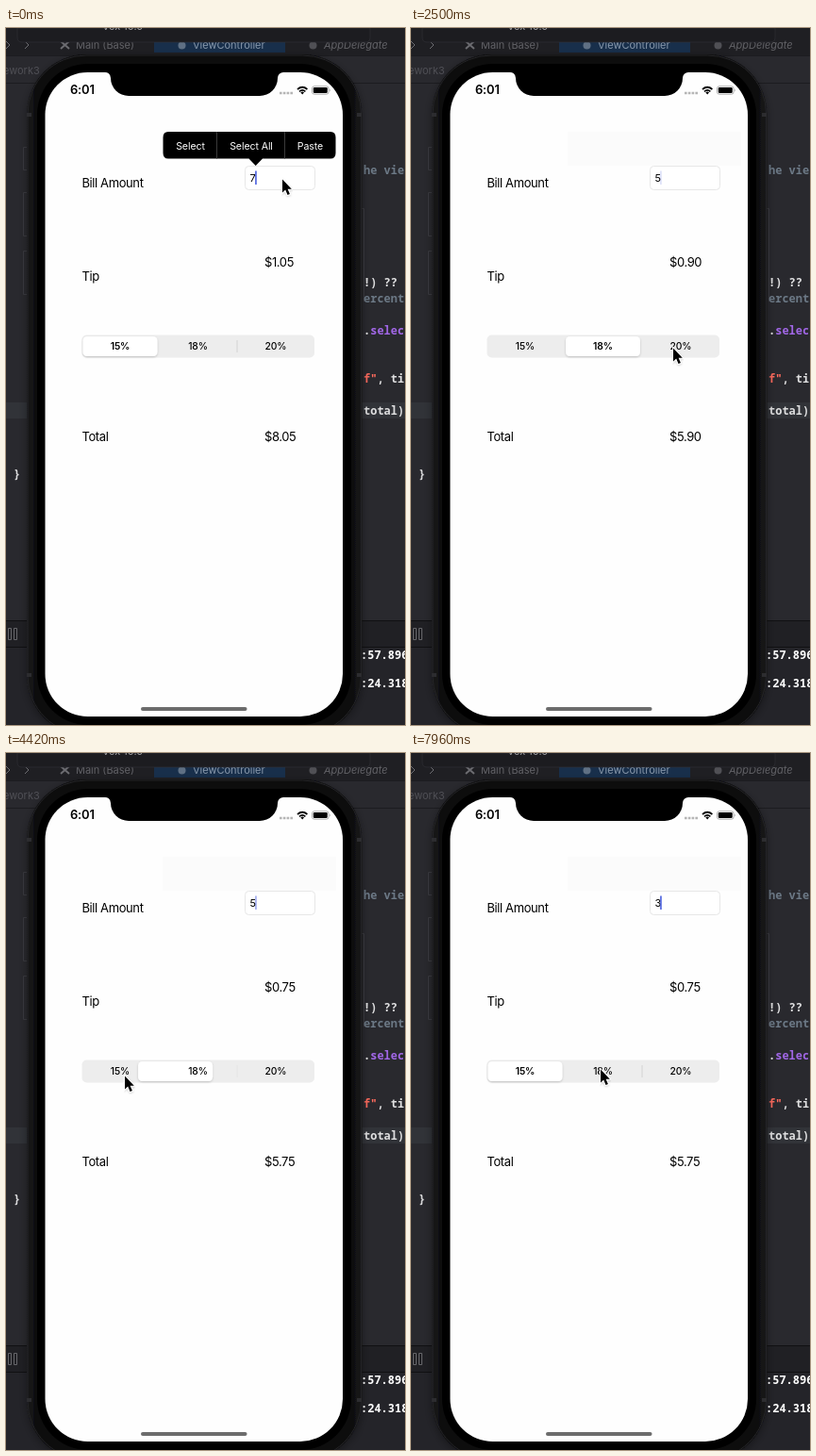
An HTML page for the animation above (8000 ms loop, 423 by 739 pixels).

```html
<!DOCTYPE html>
<html lang="en">
<head>
<meta charset="utf-8">
<title>Tip calculator</title>
<style>
  html, body { margin: 0; width: 100%; height: 100%; overflow: hidden; background: #29292e; }
  svg { display: block; width: 423px; height: 739px; font-family: Inter, "Noto Sans", sans-serif; }
  .code { font: 600 12px "Noto Sans Mono", "DejaVu Sans Mono", monospace; fill: #dfdfe0; white-space: pre; }
  .tab { font-size: 11px; fill: #626267; }
  .label { font-size: 13px; letter-spacing: -.4px; }
  .menu { font-size: 10.6px; letter-spacing: -.1px; fill: #fff; text-anchor: middle; }
  .seg { font-size: 10.3px; letter-spacing: -.1px; text-anchor: middle; }
</style>
</head>
<body>
<svg viewBox="0 0 423 739">
  <defs>
    <linearGradient id="rim">
      <stop offset="0" stop-color="#1a1a1c"/><stop offset=".035" stop-color="#0b0b0c"/>
      <stop offset=".965" stop-color="#0b0b0c"/><stop offset="1" stop-color="#1a1a1c"/>
    </linearGradient>
    <filter id="lift" x="-10%" y="-20%" width="120%" height="150%">
      <feDropShadow dx="0" dy="1" stdDeviation="1.2" flood-opacity=".2"/>
    </filter>
    <filter id="glow" x="-10%" y="-5%" width="120%" height="110%">
      <feDropShadow dx="0" dy="3" stdDeviation="5" flood-opacity=".35"/>
    </filter>
  </defs>

  <!-- editor behind the phone -->
  <rect width="423" height="739" fill="#29292e"/>
  <rect width="423" height="29" fill="#1f1f23"/>
  <rect x="157" y="5" width="139" height="21" fill="#182f4b"/>
  <path d="M0 29.500H423M0 58.500H423" stroke="#1c1c20"/>
  <path d="M0 14L4 18L0 22M20 14L24 18L20 22" fill="none" stroke="#6c6c71"/>
  <path d="M58 14L67 22M67 14L58 22" stroke="#6c6c71" stroke-width="2"/>
  <circle cx="186.500" cy="18.500" r="4" fill="#5f7084"/>
  <circle cx="325.500" cy="18.500" r="4" fill="#505055"/>
  <text class="tab" x="74" y="22">Main (Base)</text>
  <text class="tab" x="198" y="22" style="fill:#8898ab">ViewController</text>
  <text class="tab" x="337" y="22" font-style="italic">AppDelegate</text>
  <text class="tab" x="-3" y="49" style="fill:#505056">ework3</text>
  <path d="M12 0H386V10Q386 15 381 15H17Q12 15 12 10Z" fill="#1c1c20" stroke="#303035" stroke-width=".7"/>
  <text class="tab" x="102" y="2" style="fill:#a0a0a4">Vex 10.0</text>
  <rect y="397" width="423" height="17" fill="#313338"/>
  <path d="M24 126.500H18.500V150.500H24M24 174.500H18.500V220.500H24M24 236.500H18.500V282.500H24M376 191.500H379.500V290" fill="none" stroke="#3b3b41"/>
  <g class="code">
    <text x="379" y="155" fill="#6c7986">he vie</text>
    <text x="379" y="274">!) ??</text>
    <text x="379" y="291" fill="#6c7986">ercent</text>
    <text x="379" y="325">.<tspan fill="#a167e6">selec</tspan></text>
    <text x="379" y="376"><tspan fill="#fc6a5d">f"</tspan>, ti</text>
    <text x="379" y="410">total)</text>
    <text x="8" y="477">}</text>
  </g>
  <rect y="628" width="423" height="28" fill="#202024"/>
  <rect y="656" width="423" height="83" fill="#242429"/>
  <path d="M0 628.500H423M0 656.500H423" stroke="#101012"/>
  <path d="M2.500 636.500H5.500V648.500H2.500ZM8.500 636.500H11.500V648.500H8.500Z" fill="none" stroke="#66666a"/>
  <g class="code" style="font-weight:700">
    <text x="376" y="669" fill="#fff">:57.896</text>
    <text x="376" y="699" fill="#fff">:24.318</text>
  </g>

  <!-- phone -->
  <rect x="22" y="28" width="355.500" height="722" rx="63" fill="url(#rim)" filter="url(#glow)"/>
  <rect x="23" y="29" width="353.500" height="720" rx="62" fill="none" stroke="#242427"/>
  <rect x="33" y="38" width="333" height="701" rx="54" fill="#000"/>
  <path d="M22 92H27M372 92H377M22 686H27M372 686H377" stroke="#2c2c2f" stroke-width="4"/>
  <rect x="41.500" y="47" width="315.500" height="683" rx="45" fill="#fefefe"/>
  <path d="M104 46H294V47A6 6 0 0 0 288 53A19 19 0 0 1 269 72H130A19 19 0 0 1 111 53A6 6 0 0 0 104 47Z"/>
  <text x="68" y="70" font-size="13" font-weight="600" letter-spacing="-.2">6:01</text>
  <path d="M290 69H304" stroke="#b5b5b5" stroke-width="2.500" stroke-dasharray="2.600 1.200"/>
  <path d="M309 65Q314.200 60.500 319.400 65M311 67.300Q314.200 64.600 317.400 67.300" fill="none" stroke="#000" stroke-width="1.700"/>
  <path d="M312.300 68.300Q314.200 66.800 316.100 68.300L314.200 70.400Z"/>
  <rect x="324.500" y="61.800" width="17.500" height="8.400" rx="2.300" fill="none" stroke="#999" stroke-width=".8"/>
  <rect x="325.800" y="63.100" width="14.900" height="5.800" rx="1.200"/>
  <path d="M343 64.500Q344.500 66 343 67.500Z" fill="#999"/>
  <rect x="143" y="720" width="112.500" height="4" rx="2" fill="#6c6c6c"/>

  <!-- app -->
  <rect id="ghost" x="166" y="110" width="184" height="36" fill="#fbfbfb"/>
  <text class="label" x="80.500" y="168.500">Bill Amount</text>
  <text class="label" x="80.500" y="268">Tip</text>
  <text class="label" x="80.500" y="438">Total</text>
  <text class="label" id="tip" x="274" y="253"></text>
  <text class="label" id="total" x="274" y="438"></text>
  <rect x="253.500" y="146.500" width="74" height="25" rx="4" fill="#fff" stroke="#e7e7e7"/>
  <text id="bill" x="258.500" y="163" font-size="11"></text>
  <rect id="caret" y="151.500" width="1.500" height="14.500" fill="#3e55dc"/>
  <rect x="80.500" y="325.500" width="246.500" height="24" rx="5" fill="#ededed"/>
  <g id="splits" stroke="#d3d3d3"></g>
  <rect id="thumb" y="327" width="79" height="21" rx="4.500" fill="#fff" filter="url(#lift)"/>
  <g id="segments"></g>
  <g id="menu">
    <path d="M172 110H344Q349.500 110 349.500 116V132.500Q349.500 138.500 344 138.500H272L264.700 146L257.500 138.500H172Q166.500 138.500 166.500 132.500V116Q166.500 110 172 110Z"/>
    <path d="M223.500 110V138.500M295.500 110V138.500" stroke="#3a3a3a"/>
    <text class="menu" x="195.500" y="128.500">Select</text>
    <text class="menu" x="260" y="128.500">Select All</text>
    <text class="menu" x="322.500" y="128.500">Paste</text>
  </g>
  <path id="pointer" d="M0 0V14L3.200 11L5.500 16.400L7.900 15.400L5.600 10.200H9.800Z" stroke="#fff" stroke-width="1.800" paint-order="stroke" filter="url(#lift)"/>
</svg>
<script>
const LOOP = 8000, STEP = 147.3, SEGMENT = 82.5;
const RATES = [.15, .18, .2];
const $ = id => document.getElementById(id);
const clamp = v => Math.max(0, Math.min(1, v));
const smooth = v => v * v * (3 - 2 * v);
const latest = (list, t) => list.findLastIndex(item => item.at <= t);

const moves = [
  { at: 0, until: 1, x: 293, y: 160.5 },
  { at: 1000, until: 1470, x: 195, y: 337.5 },
  { at: 2120, until: 2500, x: 278, y: 339.5 },
  { at: 3300, until: 3680, x: 126, y: 342.5 },
  { at: 4720, until: 5400, x: 276, y: 160.5 },
  { at: 6860, until: 7600, x: 201, y: 335.5 },
];
const keystrokes = [
  { at: 0, text: "7" }, { at: 430, text: "" }, { at: 1020, text: "5" },
  { at: 6480, text: "" }, { at: 6920, text: "3" },
];
const taps = [
  { at: -1000, segment: 0, bill: 7 }, { at: 1600, segment: 1, bill: 5 },
  { at: 2930, segment: 2, bill: 5 }, { at: 4250, segment: 0, bill: 5 },
];

function addSvg(parent, tag, attributes, text = "") {
  const node = document.createElementNS("http://www.w3.org/2000/svg", tag);
  for (const name in attributes) node.setAttribute(name, attributes[name]);
  node.textContent = text;
  return parent.appendChild(node);
}
const labels = RATES.map((rate, i) =>
  addSvg($("segments"), "text", { class: "seg", x: 121 + SEGMENT * i, y: 341 }, rate * 100 + "%"));
const splits = [1, 2].map(i =>
  addSvg($("splits"), "path", { d: `M${80 + SEGMENT * i} 331v13` }));

// stays solid after a key, then fades out, rests and fades in
function caretOpacity(sinceKey) {
  const age = sinceKey - 400;
  if (age < 0) return 1;
  const phase = age % 980;
  return Math.max(clamp(1 - phase / 130), clamp((phase - 320) / 200));
}

function pointerAt(t) {
  return moves.reduce((p, m) => {
    const k = smooth(clamp((t - m.at) / (m.until - m.at)));
    return { x: p.x + (m.x - p.x) * k, y: p.y + (m.y - p.y) * k };
  }, moves[0]);
}

function draw(time) {
  const t = Math.floor((time % LOOP + 10) / STEP) * STEP;

  const menuOpacity = t < 430 ? 1 : t < 570 ? .5 : 0;
  $("menu").setAttribute("opacity", menuOpacity);
  $("ghost").setAttribute("opacity", menuOpacity ? 0 : 1);

  const key = keystrokes[latest(keystrokes, t)];
  $("bill").textContent = key.text;
  $("caret").setAttribute("x", key.text ? 264.2 : 258.7);
  $("caret").setAttribute("opacity", caretOpacity(t - key.at));

  const n = latest(taps, t), tap = taps[n];
  const from = taps[Math.max(0, n - 1)].segment;
  const eased = 1 - (1 - clamp((t - tap.at) / 450)) ** 2.2;
  const slot = from + (tap.segment - from) * eased;
  $("thumb").setAttribute("x", 81.5 + SEGMENT * slot);
  labels.forEach((label, i) => label.style.fontWeight = Math.abs(slot - i) < .15 ? 600 : 500);
  splits.forEach((split, i) =>
    split.setAttribute("opacity", clamp(Math.abs(slot - i - .5) * 1.2 - .6)));

  const tip = tap.bill * RATES[tap.segment];
  $("tip").textContent = "$" + tip.toFixed(2);
  $("total").textContent = "$" + (tap.bill + tip).toFixed(2);

  const { x, y } = pointerAt(t);
  $("pointer").setAttribute("transform", `translate(${x} ${y})`);
}

const began = performance.now();
function tick() {
  draw(performance.now() - began);
  requestAnimationFrame(tick);
}
tick();
</script>
</body>
</html>
```
